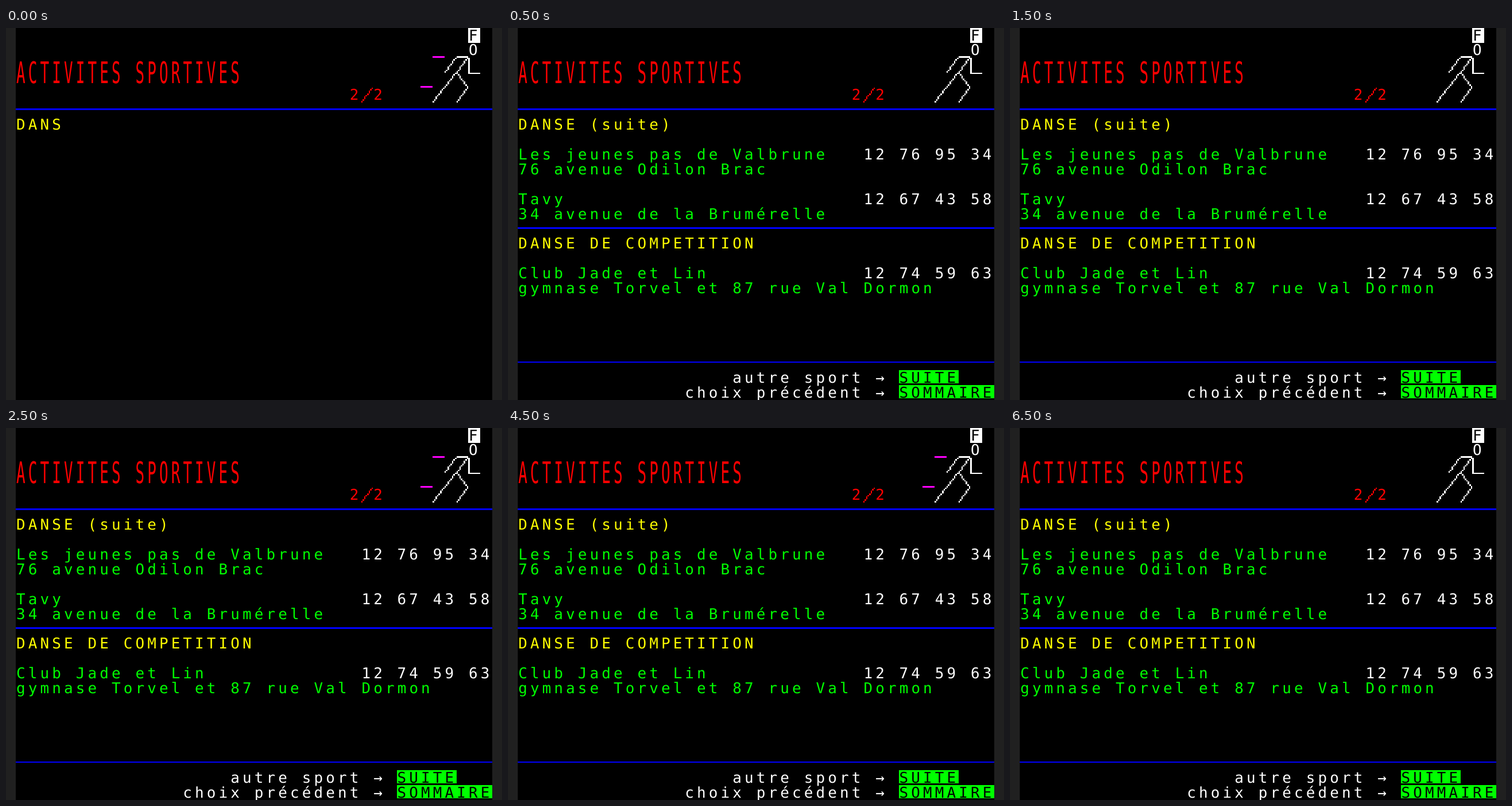
Recreate the animation shown at these times as an HTML page. Size 864 px wide and 648 px high, loop 8 s.

```html
<!DOCTYPE html>
<html lang="fr">
<head>
<meta charset="utf-8">
<title>Activités sportives</title>
<style>
  html, body { margin: 0; height: 100%; overflow: hidden; background: #202020; }
  svg { display: block; width: 100vw; height: 100vh; }
  rect, path { shape-rendering: crispEdges; }
  text {
    font: 10px "DejaVu Sans Mono", monospace;
    letter-spacing: 1.98px; /* fills an 8-unit cell */
    white-space: pre;
    text-rendering: geometricPrecision;
  }
</style>
</head>
<body>
<svg viewBox="-6.6667 0 333.3333 250" preserveAspectRatio="none">
  <rect width="320" height="250"/>
  <g id="head"></g>
  <g id="dash"></g>
  <g id="start"></g>
  <g id="page"></g>
</svg>
<script>
// Terminal screen: 40 x 25 cells, each 8 x 10 units.
const W = 8, H = 10, LOOP = 8000;
const RED = '#f00', GREEN = '#0f0', BLUE = '#00f', YELLOW = '#ff0', WHITE = '#fff', MAGENTA = '#f0f';
const [head, dash, start, page] = ['head', 'dash', 'start', 'page'].map(id => document.getElementById(id));

function add(parent, tag, attrs) {
  const el = document.createElementNS('http://www.w3.org/2000/svg', tag);
  for (const k in attrs) el.setAttribute(k, attrs[k]);
  return parent.appendChild(el);
}

function box(parent, col, row, fill, x, y, width, height) {
  add(parent, 'rect', { x: col * W + x, y: row * H + y, width, height, fill });
}

function write(parent, col, row, fill, str) {
  add(parent, 'text', { x: col * W + 0.3, y: row * H + 8.3, fill }).textContent = str;
}

// Stepped diagonal across one cell: dir 1 is "/", -1 is "\".
function slash(col, row, fill, dir = 1) {
  let d = '';
  for (let i = 0; i < H; i++) {
    const s = Math.round(i * 7 / 9);
    d += `M${col * W + (dir > 0 ? 7 - s : s)} ${row * H + i}h1v1h-1z`;
  }
  add(head, 'path', { d, fill });
}

const rule = (parent, row) => box(parent, 0, row, BLUE, 0, 4, 320, 1);

function key(row, label) {
  box(page, 32, row, GREEN, 0, 0, label.length * W, 9);
  write(page, 32, row, '#000', label);
}

// Heading, double height
add(head, 'text', { transform: 'translate(.3 37) scale(1 2)', fill: RED })
  .textContent = 'ACTIVITES SPORTIVES';
write(head, 28, 4, RED, '2 2');
slash(29, 4, RED);
rule(head, 5);

// Runner
box(head, 38, 0, WHITE, 0, 0, W, H);
write(head, 38, 0, '#000', 'F');
write(head, 38, 1, WHITE, 'O');
box(head, 37, 1, WHITE, 0, 9, W, 1);
box(head, 38, 2, WHITE, 0, 0, 1, H);
box(head, 38, 3, WHITE, 0, 0, W, 1);
for (const [col, row] of [[36, 2], [37, 2], [36, 3], [35, 4], [37, 4]]) slash(col, row, WHITE);
slash(37, 3, WHITE, -1);

// Blinking speed marks
box(dash, 35, 1, MAGENTA, 0, 9, W, 1);
box(dash, 34, 3, MAGENTA, 0, 9, W, 1);

write(start, 0, 6, YELLOW, 'DANS');

// Full page
write(page, 0, 6, YELLOW, 'DANSE (suite)');
write(page, 0, 8, GREEN, 'Les jeunes pas de Valbrune');
write(page, 29, 8, WHITE, '12 76 95 34');
write(page, 0, 9, GREEN, '76 avenue Odilon Brac');
write(page, 0, 11, GREEN, 'Tavy');
write(page, 29, 11, WHITE, '12 67 43 58');
write(page, 0, 12, GREEN, '34 avenue de la Brumérelle');
rule(page, 13);
write(page, 0, 14, YELLOW, 'DANSE DE COMPETITION');
write(page, 0, 16, GREEN, 'Club Jade et Lin');
write(page, 29, 16, WHITE, '12 74 59 63');
write(page, 0, 17, GREEN, 'gymnase Torvel et 87 rue Val Dormon');
rule(page, 22);
write(page, 18, 23, WHITE, 'autre sport →');
key(23, 'SUITE');
write(page, 14, 24, WHITE, 'choix précédent →');
key(24, 'SOMMAIRE');

const toggles = [500, 1000, 1500, 2500, 3500, 4500, 6500];
const show = (el, on) => { el.style.display = on ? '' : 'none'; };

function draw(now) {
  const t = now % LOOP;
  show(dash, toggles.filter(at => at <= t).length % 2 === 0);
  show(start, t < 500);
  show(page, t >= 500);
  requestAnimationFrame(draw);
}
draw(performance.now());
</script>
</body>
</html>
```
